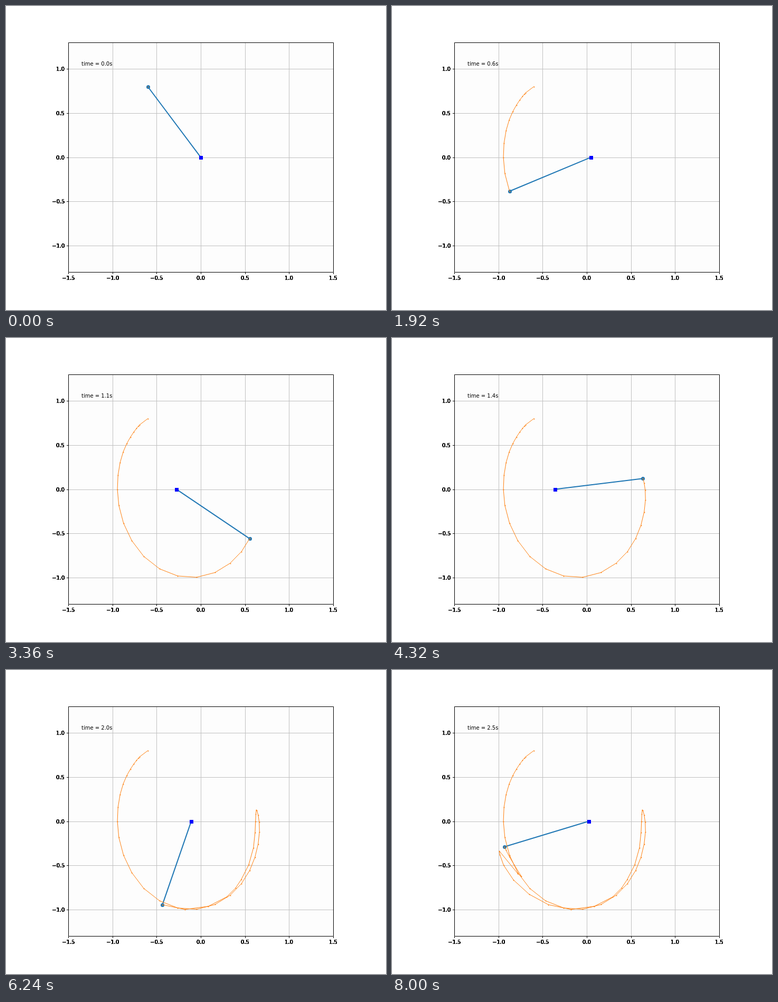
Recreate the animation shown at these times as an HTML page with a canvas. Size 720x576 px, loop 8.16 s.

```html
<!DOCTYPE html>
<html lang="en">
<head>
<meta charset="utf-8">
<title>Pendulum on a cart</title>
<style>
html, body { margin: 0; width: 100%; height: 100%; overflow: hidden; background: #fff; }
canvas { display: block; }
</style>
</head>
<body>
<canvas id="stage" width="720" height="576"></canvas>
<script>
const ctx = document.getElementById('stage').getContext('2d');
const STEP = 160, COUNT = 51;
const UNIT = 167.26, CX = 369, CY = 286.56;
const BLUE = '#1f77b4', ORANGE = '#ff7f0e', GRID = '#c0c0c0';

// Key poses [step, rod angle from upright, cart x]; each phase starts with a jump.
const phases = [
  [[0, 0.6435, 369]],
  [[1, 0.757, 367.4], [6, 1.027, 372], [10, 1.573, 378.3], [13, 2.192, 374.3],
   [16, 2.955, 356.4], [19, 3.719, 333.4], [22, 4.291, 319], [25, 4.704, 312.5],
   [28, 4.84, 308.3], [31, 4.584, 306], [34, 3.992, 320], [36, 3.684, 332],
   [39, 2.809, 351], [42, 2.093, 356.5], [44, 1.915, 360.8]],
  [[45, 2.207, 373], [46, 2.248, 375.7], [47, 2.086, 377], [50, 1.865, 373]]
];

// Cubic Hermite curve through the keys, at rest at both ends of a phase.
function curve(keys, step, col) {
  const n = keys.findIndex(k => k[0] >= step);
  if (keys[n][0] === step) return keys[n][col];
  const a = keys[n - 1], b = keys[n], span = b[0] - a[0], u = (step - a[0]) / span;
  const slope = m => {
    const p = keys[m - 1], q = keys[m + 1];
    return p && q ? (q[col] - p[col]) / (q[0] - p[0]) : 0;
  };
  return a[col] + (b[col] - a[col]) * u * u * (3 - 2 * u)
    + span * u * (1 - u) * (slope(n - 1) * (1 - u) - slope(n) * u);
}

const poses = Array.from({ length: COUNT }, (_, i) => {
  const keys = phases.find(p => p[p.length - 1][0] >= i);
  const angle = curve(keys, i, 1), cart = curve(keys, i, 2);
  return { cart, bob: [cart - UNIT * Math.sin(angle), CY - UNIT * Math.cos(angle)] };
});

const snap = v => Math.round(v) + 0.5;
const label = v => v.toFixed(1).replace('-', '\u2212');

function line(points, color, width) {
  ctx.beginPath();
  points.forEach(p => ctx.lineTo(...p));
  ctx.strokeStyle = color;
  ctx.lineWidth = width;
  ctx.stroke();
}

function dot([x, y], radius, color) {
  ctx.fillStyle = color;
  ctx.beginPath();
  ctx.arc(snap(x), snap(y), radius, 0, 2 * Math.PI);
  ctx.fill();
}

// anchor: 0 left, 0.5 centre, 1 right; repeats harden the soft edges.
function text(s, x, y, anchor = 0, repeat = 1) {
  ctx.font = '10px "DejaVu Sans", sans-serif';
  ctx.fillStyle = '#000';
  const left = Math.round(x - anchor * ctx.measureText(s).width);
  while (repeat--) ctx.fillText(s, left, y);
}

function axes() {
  ctx.fillStyle = '#fff';
  ctx.fillRect(0, 0, 720, 576);
  ctx.fillStyle = '#fdfdfd';
  ctx.fillRect(118, 69, 502, 435);
  for (let v = -1.5; v <= 1.5; v += 0.5) {
    const x = snap(CX + v * UNIT);
    line([[x, 69], [x, 504]], GRID, 1);
    line([[x, 505], [x, 508]], '#000', 1);
    text(label(v), CX + v * UNIT, 519, 0.5, 10);
  }
  for (let v = -1; v <= 1; v += 0.5) {
    const y = snap(CY - v * UNIT);
    line([[118, y], [620, y]], GRID, 1);
    line([[115, y], [118, y]], '#000', 1);
    text(label(v), 111, y + 3.5, 1, 10);
  }
  ctx.strokeStyle = '#000';
  ctx.strokeRect(118.5, 69.5, 502, 435);
}

function draw(i) {
  const { cart, bob } = poses[i];
  const trail = poses.slice(0, i + 1).map(p => p.bob);
  axes();
  line([[cart, CY], bob], BLUE, 2);
  dot(bob, 3.5, BLUE);
  line(trail, ORANGE, 1);
  trail.forEach(p => dot(p, 1, ORANGE));
  ctx.fillStyle = '#00f';
  ctx.fillRect(Math.round(cart) - 3, 284, 7, 7);

  // Exact quarter ties round to the even digit.
  const t = i * 0.05 - (i % 20 === 5 ? 0.01 : 0);
  text(`time = ${t.toFixed(1)}s`, 143, 113);
}

ctx.lineJoin = 'round';
const start = performance.now();
function tick() {
  draw(Math.floor((performance.now() - start) / STEP) % COUNT);
  requestAnimationFrame(tick);
}
tick();
</script>
</body>
</html>
```
